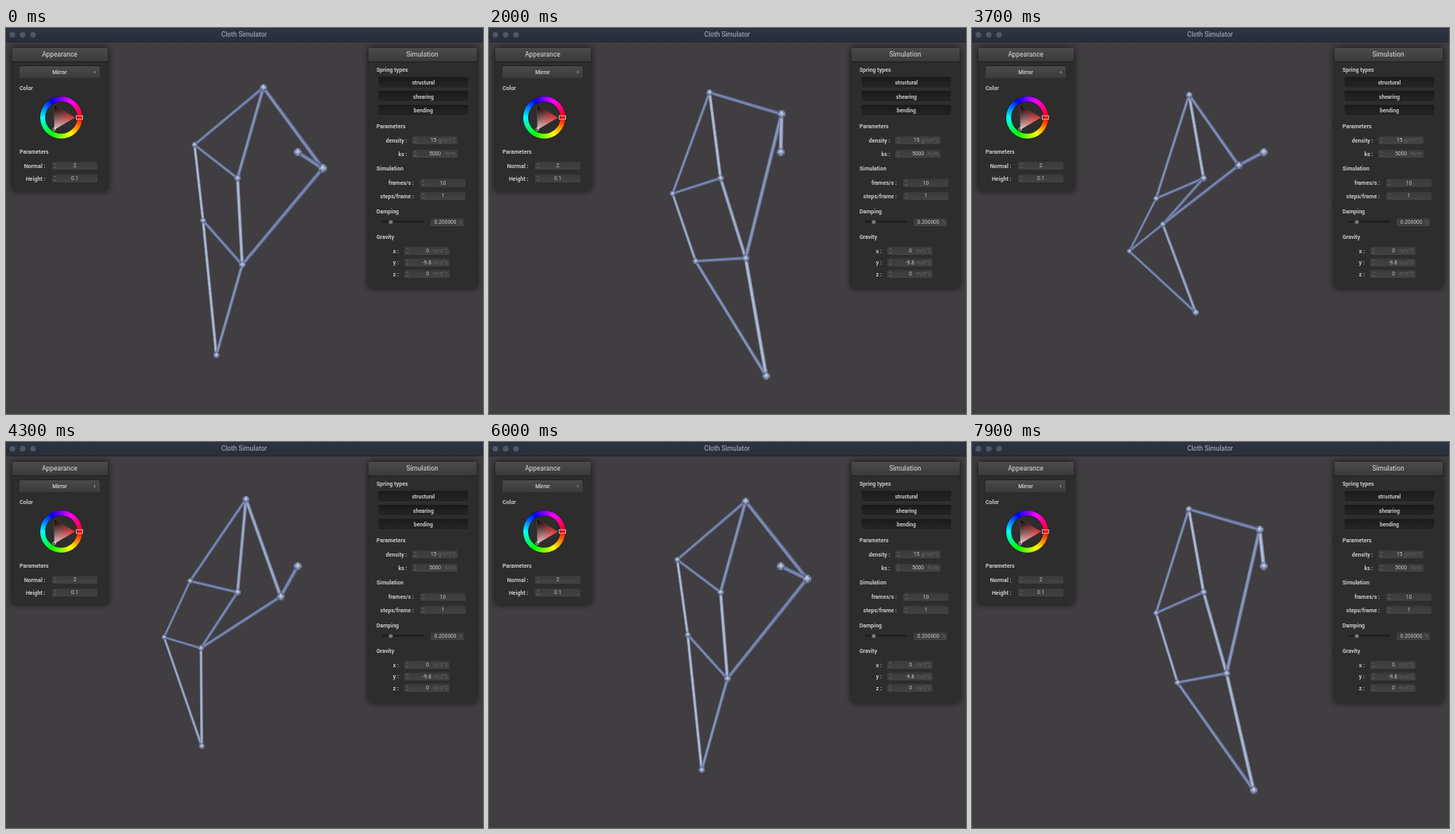
Write an HTML page with a canvas that moves like this. It is 600 px wide and 485 px high and loops after 8000 ms.

```html
<!DOCTYPE html>
<html lang="en">
<head>
<meta charset="utf-8">
<title>Cloth Simulator</title>
<style>
html, body { margin: 0; width: 100%; height: 100%; overflow: hidden; background: #403e40; }
canvas { display: block; }
</style>
</head>
<body>
<canvas id="stage" width="600" height="485"></canvas>
<script>
const ctx = document.getElementById('stage').getContext('2d');
const LOOP = 8000, STEP = 100;
const FONT = 'Roboto, "Open Sans", sans-serif';

// Crank angle in degrees over time in ms; the simulation speed drifts a little.
const CRANK = [[0, -29.8], [1300, 44.7], [2600, 125.6], [3700, 195.5],
               [5000, 270], [6900, 394.6], [7900, 458.6]];

function crankAngle(t) {
  let i = 1;
  while (i < CRANK.length - 1 && CRANK[i][0] < t) i++;
  const [t0, a0] = CRANK[i - 1], [t1, a1] = CRANK[i];
  return (a0 + (a1 - a0) * (t - t0) / (t1 - t0)) * Math.PI / 180;
}

// Point at distance rp from p and rq from q, on the left (1) or right (-1) of p->q.
function join(p, q, rp, rq, side) {
  const dx = q[0] - p[0], dy = q[1] - p[1], d = Math.hypot(dx, dy);
  const a = (rp * rp - rq * rq + d * d) / (2 * d);
  const h = side * Math.sqrt(Math.max(0, rp * rp - a * a));
  return [p[0] + (a * dx - h * dy) / d, p[1] + (a * dy + h * dx) / d];
}

// Perspective view of the linkage plane.
function project([x, y]) {
  const w = 1 - 0.004 * x;
  return { x: (367 + 0.826 * x) / w, y: (156 - 0.963 * x - 3.18 * y) / w, s: w ** -1.5 };
}

// Walking-leg linkage with Jansen's bar lengths.
function linkage(angle) {
  const O = [0, 0], B = [-38, -7.8];
  const C = [15 * Math.cos(angle), 15 * Math.sin(angle)];
  const D = join(B, C, 41.5, 50, 1);
  const F = join(B, C, 39.3, 61.9, -1);
  const E = join(B, D, 40.1, 55.8, 1);
  const G = join(E, F, 39.4, 36.7, -1);
  const H = join(G, F, 65.7, 49, -1);
  return [O, B, C, D, E, F, G, H].map(project);
}
const BARS = ['EG', 'DE', 'BE', 'FG', 'GH', 'FH', 'BF', 'BD', 'CF', 'CD', 'OC'];

const mix = (a, b, k) => `rgb(${a.map((v, i) => Math.round(v + (b[i] - v) * k))})`;

function drawBar(p, q) {
  const dx = q.x - p.x, dy = q.y - p.y, len = Math.hypot(dx, dy);
  const nx = -dy / len, ny = dx / len, side = nx > 0 ? 1 : -1;
  const a = 2.8 * p.s, b = 2.8 * q.s, r = (a + b) / 2;
  // steep bars leaning slightly to the left reflect the most light
  const lean = dx * Math.sign(dy) / len, shine = Math.exp(-10 * (lean - 0.12) ** 2);
  const g = ctx.createLinearGradient(p.x - side * nx * r, p.y - side * ny * r,
                                     p.x + side * nx * r, p.y + side * ny * r);
  g.addColorStop(0, mix([72, 79, 110], [98, 107, 138], shine));
  g.addColorStop(0.4, mix([136, 149, 190], [201, 209, 228], shine));
  g.addColorStop(0.65, mix([115, 127, 168], [176, 186, 210], shine));
  g.addColorStop(1, mix([68, 74, 102], [88, 95, 122], shine));
  ctx.fillStyle = g;
  ctx.beginPath();
  ctx.moveTo(p.x + nx * a, p.y + ny * a);
  ctx.lineTo(q.x + nx * b, q.y + ny * b);
  ctx.lineTo(q.x - nx * b, q.y - ny * b);
  ctx.lineTo(p.x - nx * a, p.y - ny * a);
  ctx.fill();
  // fine mesh texture
  ctx.strokeStyle = 'rgba(62,70,104,.25)';
  ctx.lineWidth = 1.6;
  ctx.setLineDash([1, 1.7]);
  ctx.beginPath();
  ctx.moveTo(p.x, p.y);
  ctx.lineTo(q.x, q.y);
  ctx.stroke();
  ctx.setLineDash([]);
}

function drawJoint({ x, y, s }) {
  const r = 5.3 * s;
  const g = ctx.createRadialGradient(x, y - r * 0.3, 0, x, y, r);
  g.addColorStop(0, '#cfd7ea');
  g.addColorStop(0.55, '#929dbf');
  g.addColorStop(1, '#596180');
  disc(x, y, r, g);
  for (const i of [-1, 1]) for (const j of [-1, 1])
    disc(x + i * r * 0.5, y + j * r * 0.5, r * 0.18, 'rgba(56,63,92,.6)');
}

function disc(x, y, r, fill) {
  ctx.fillStyle = fill;
  ctx.beginPath();
  ctx.arc(x, y, r, 0, 7);
  ctx.fill();
}

function text(s, x, y, { size = 7, color = '#c8c8c8', align = 'left', weight = 700 } = {}) {
  ctx.font = `${weight} ${size}px ${FONT}`;
  ctx.textAlign = align;
  ctx.textBaseline = 'middle';
  ctx.fillStyle = color;
  ctx.fillText(s, x, y + 0.5);
}

function box(x, y, w, h, top, bottom = top, radius = 1.5) {
  const g = ctx.createLinearGradient(0, y, 0, y + h);
  g.addColorStop(0, top);
  g.addColorStop(1, bottom);
  ctx.fillStyle = g;
  ctx.beginPath();
  ctx.roundRect(x, y, w, h, radius);
  ctx.fill();
}

function panel(x, w, h, title) {
  ctx.save();
  ctx.shadowColor = 'rgba(0,0,0,.75)';
  ctx.shadowBlur = 9;
  box(x, 25, w, h, '#2d2d2d');
  ctx.restore();
  box(x, 25, w, 17, '#4b4b4b', '#3a3a3a');
  ctx.fillStyle = '#1f1f1f';
  ctx.fillRect(x, 42, w, 1);
  text(title, x + w / 2 - 0.5, 33.5, { size: 8.4, align: 'center', color: '#bfbfbf', weight: 500 });
}

function button(label, x, y, w, h, top, bottom) {
  box(x - 0.5, y - 0.5, w + 1, h + 1, '#151515', '#3c3c3c', 2);
  box(x, y, w, h, top, bottom);
  text(label, x + w / 2, y + h / 2, { size: 6.6, align: 'center' });
}

function chevron(x, y, dy) {
  ctx.strokeStyle = '#7a7a7a';
  ctx.lineWidth = 0.7;
  ctx.beginPath();
  ctx.moveTo(x - 1.3, y);
  ctx.lineTo(x, y + dy);
  ctx.lineTo(x + 1.3, y);
  ctx.stroke();
}

// Labelled number box; the value is centred unless a unit follows it.
function field(label, labelX, x, y, value, unit, valueX) {
  text(label, labelX, y, { align: 'right' });
  box(x, y - 5, 57, 10, '#3a3a3a', '#424242');
  chevron(x + 4, y - 1.5, -1.4);
  chevron(x + 4, y + 1.5, 1.4);
  const style = { size: 6.6, weight: 400 };
  text(value, unit ? valueX : x + 28.5, y, { ...style, align: unit ? 'right' : 'center' });
  if (unit) text(unit, x + 54.5, y, { ...style, align: 'right', color: '#666' });
}

function colorWheel(x, y) {
  const ring = ctx.createConicGradient(0, x, y);
  for (let i = 0; i <= 6; i++) ring.addColorStop(i / 6, `hsl(${i * 60} 100% 50%)`);
  disc(x, y, 27, '#1a1a1a');
  disc(x, y, 26.5, ring);
  disc(x, y, 20.3, '#1c1c1c');
  disc(x, y, 19.6, '#2d2d2d');
  const r = 17.5, cx = x - r / 2, dy = r * 0.866;
  const fillTriangle = g => {
    ctx.fillStyle = g;
    ctx.beginPath();
    ctx.moveTo(x + r, y);
    ctx.lineTo(cx, y + dy);
    ctx.lineTo(cx, y - dy);
    ctx.fill();
  };
  const tint = ctx.createLinearGradient(x + r, y, cx, y + dy);
  tint.addColorStop(0, '#e63030');
  tint.addColorStop(1, '#e0d0d0');
  fillTriangle(tint);
  const shade = ctx.createLinearGradient(x + r / 4, y + dy / 2, cx, y - dy);
  shade.addColorStop(0, 'rgba(0,0,0,0)');
  shade.addColorStop(1, '#000');
  fillTriangle(shade);
  ctx.strokeStyle = '#ddd';
  ctx.lineWidth = 0.8;
  ctx.strokeRect(x + 18.8, y - 2.3, 8, 4.6);
  ctx.beginPath();
  ctx.arc(cx, y + dy - 0.5, 1.8, 0, 7);
  ctx.stroke();
}

function drawWindow() {
  ctx.fillStyle = '#403e40';
  ctx.fillRect(0, 0, 600, 485);
  box(0, 0, 600, 17, '#2e3342', '#2a2e3a', 0);
  ctx.fillStyle = '#23262e';
  ctx.fillRect(0, 17, 600, 1);
  for (const x of [8, 21, 34]) disc(x, 8.5, 3.6, '#505664');
  text('Cloth Simulator', 299.5, 8.5, { size: 8.3, align: 'center', color: '#9a9da6', weight: 500 });
}

function drawAppearance() {
  panel(8, 120, 179, 'Appearance');
  button('Mirror', 17, 48, 101, 14.5, '#4a4a4a', '#3b3b3b');
  text('›', 110.5, 54.5, { size: 7 });
  text('Color', 17, 75);
  colorWheel(69.5, 112.5);
  text('Parameters', 17, 155);
  field('Normal :', 49.5, 58, 173, '2');
  field('Height :', 49.5, 58, 189, '0.1');
}

function drawSimulation() {
  panel(456, 136, 302, 'Simulation');
  text('Spring types', 466, 52.5);
  ['structural', 'shearing', 'bending'].forEach((s, i) =>
    button(s, 469, 62 + i * 17.6, 112, 13, '#1b1b1b', '#252525'));
  text('Parameters', 466, 123);
  field('density :', 504.5, 511, 141, '15', 'g/cm^2', 541.5);
  field('ks :', 504.5, 511, 158, '5000', 'N/m', 547);
  text('Simulation', 466, 176.5);
  field('frames/s :', 513, 521, 194.5, '10');
  field('steps/frame :', 513, 521, 211, '1');
  text('Damping', 466, 230);
  box(473, 242.5, 53, 2, '#161616', '#202020');
  disc(484, 243.8, 3.7, '#1a1a1a');
  disc(484, 243.8, 3.1, '#555');
  disc(484, 243.8, 1.6, '#8c8c8c');
  box(534, 239, 42, 10, '#3a3a3a', '#424242');
  text('0.200000', 566.5, 244, { size: 6.6, weight: 400, align: 'right' });
  text('%', 574, 244, { size: 6.6, weight: 400, align: 'right', color: '#666' });
  text('Gravity', 466, 262);
  field('x :', 494, 501, 280, '0', 'm/s^2', 532);
  field('y :', 494, 501, 294.5, '-9.8', 'm/s^2', 535);
  field('z :', 494, 501, 309, '0', 'm/s^2', 532);
}

function draw(t) {
  drawWindow();
  const joints = linkage(crankAngle(t));
  const at = name => joints['OBCDEFGH'.indexOf(name)];
  for (const [p, q] of BARS) drawBar(at(p), at(q));
  joints.forEach(drawJoint);
  drawAppearance();
  drawSimulation();
}

const start = performance.now();
function tick() {
  const t = (performance.now() - start) % LOOP;
  draw(Math.floor(t / STEP) * STEP);
  requestAnimationFrame(tick);
}
tick();
</script>
</body>
</html>
```
